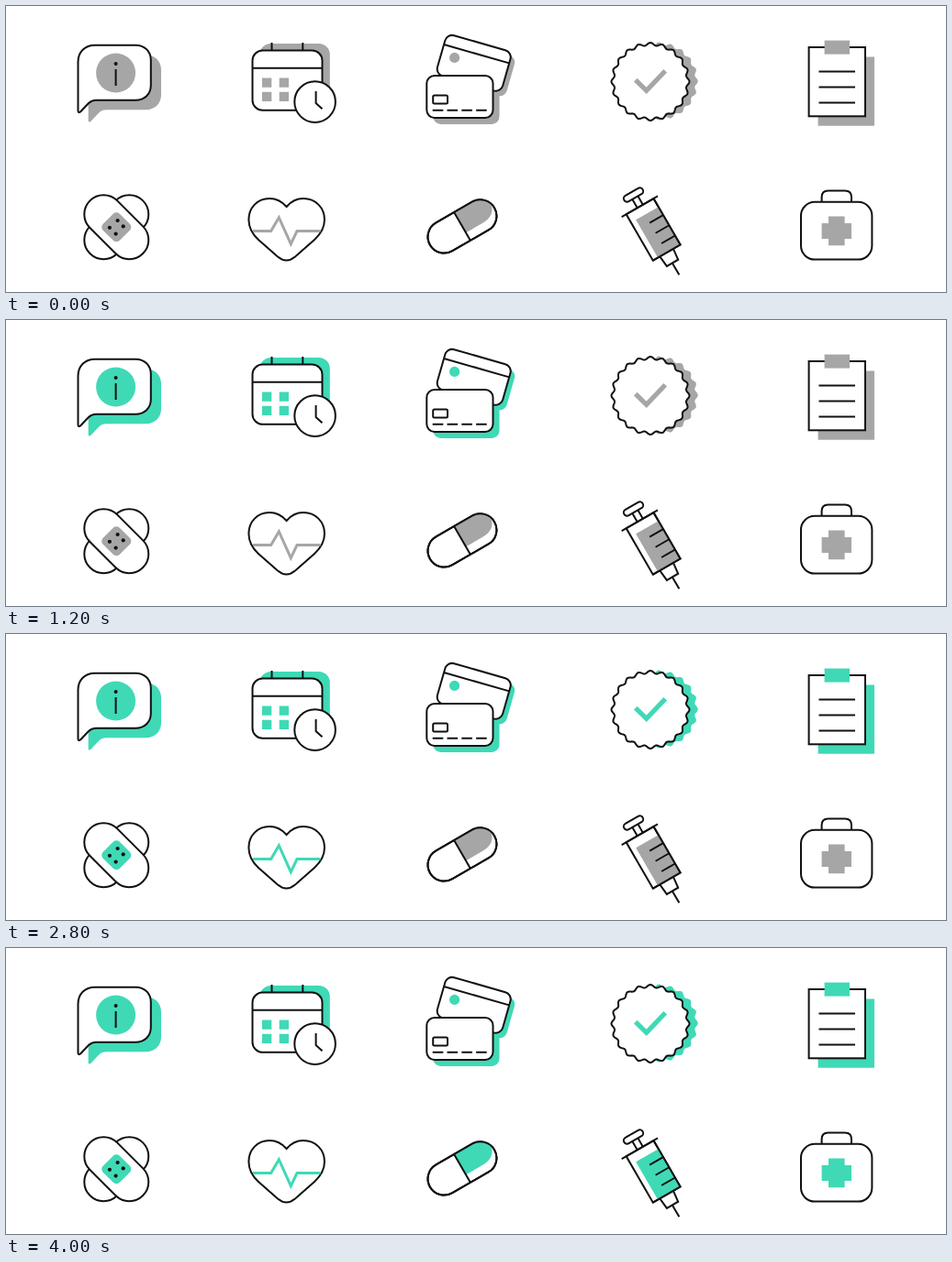
Recreate the animation shown at these times as an HTML page. Size 1024x312 px, loop 4400 ms.

```html
<!DOCTYPE html>
<html lang="en">
<head>
<meta charset="utf-8">
<title>Health icons</title>
<style>
  html, body { margin: 0; width: 100%; height: 100%; overflow: hidden; background: #fff; }
  svg { display: block; width: 100%; height: 100%; fill: #fff; stroke: #111; stroke-width: 2; }
  .icon { color: #a6a6a6; }
  .tint { fill: currentColor; stroke: none; }
  .tint-line { fill: none; stroke: currentColor; }
  .line { fill: none; }
  .dot { fill: #111; stroke: none; }
</style>
</head>
<body>
<svg viewBox="0 0 1024 312">
  <defs>
    <path id="bubble" d="M78.5 61C78.5 50 86 42.7 97 42.7H141C151 42.7 157.8 49.5 157.8 59V86.5C157.8 96 151 102.7 141 102.7H98C94.5 102.7 92.5 103.5 90 106L81.5 115C80 116.6 78.5 116.4 78.5 114.5Z"/>
    <path id="seal"/>
    <rect id="backCard" width="74" height="46" rx="8"/>
    <rect id="frontCard" x="458.3" y="76" width="72.2" height="46" rx="8.5"/>
    <rect id="plaster" x="-40.8" y="-21" width="81.6" height="42" rx="21"/>
  </defs>

  <!-- Information -->
  <g class="icon">
    <use href="#bubble" class="tint" x="11.2" y="10.5"/>
    <use href="#bubble"/>
    <circle class="tint" cx="119.6" cy="73" r="21.5"/>
    <circle class="dot" cx="119.6" cy="63" r="2"/>
    <path class="line" d="M119.6 69V87"/>
  </g>

  <!-- Calendar -->
  <g class="icon">
    <rect class="tint" x="276.5" y="41" width="76.3" height="66" rx="12"/>
    <rect x="268.5" y="48.5" width="76" height="65.3" rx="11"/>
    <path class="line" d="M268.5 67.7H344.5M289.5 40V48.5M323.3 40V48.5"/>
    <path class="tint" d="M279 78.5h10.3v10.3h-10.3zM297.7 78.5h10.3v10.3h-10.3zM279 93.7h10.3v10.3h-10.3zM297.7 93.7h10.3v10.3h-10.3z"/>
    <circle cx="336.6" cy="104.6" r="22.3"/>
    <path class="line" d="M337.6 93V106L344.5 112.3"/>
  </g>

  <!-- Payment cards -->
  <g class="icon">
    <use href="#backCard" class="tint" transform="translate(485 35.5) rotate(16)"/>
    <use href="#frontCard" class="tint" x="7" y="7"/>
    <g transform="translate(480.5 30) rotate(16)">
      <use href="#backCard"/>
      <path class="line" d="M0 12.5H74"/>
    </g>
    <circle class="tint" cx="488.6" cy="56.4" r="5.6"/>
    <use href="#frontCard"/>
    <rect x="465.2" y="97.5" width="15.8" height="9" rx="1.5"/>
    <path class="line" d="M464.7 113.7H524" stroke-dasharray="11.6 4.2"/>
  </g>

  <!-- Approved -->
  <g class="icon">
    <use href="#seal" class="tint" x="711.3" y="82"/>
    <use href="#seal" x="702" y="82.5"/>
    <path class="tint-line" d="M685.8 80.6L697.7 92.3L718.2 70.8" stroke-width="5.2"/>
  </g>

  <!-- Clipboard -->
  <g class="icon">
    <rect class="tint" x="884.6" y="55.5" width="61.4" height="75.2"/>
    <rect x="874.6" y="45" width="61.4" height="75.3"/>
    <rect class="tint" x="891.6" y="37.6" width="27.4" height="15"/>
    <path class="line" d="M885.5 71.4H925M885.5 88.4H925M885.5 105.4H925"/>
  </g>

  <!-- Plasters -->
  <g class="icon">
    <g transform="translate(120.3 241.2)">
      <use href="#plaster" transform="rotate(-45)"/>
      <use href="#plaster" transform="rotate(45)"/>
      <rect class="tint" x="-12.8" y="-12.8" width="25.6" height="25.6" rx="5" transform="rotate(45)"/>
    </g>
    <g class="dot">
      <circle cx="121.6" cy="234" r="2.1"/><circle cx="127.7" cy="240.4" r="2.1"/>
      <circle cx="112.9" cy="241.8" r="2.1"/><circle cx="119.6" cy="248.6" r="2.1"/>
    </g>
  </g>

  <!-- Heart -->
  <g class="icon">
    <path d="M305.6 219C311 212.5 317 210 324 210C337 210 347 220 347 233C347 243 342 249.5 336 255L315 273.5C309 278.5 302 278.5 296 273.5L275 255C269 249.5 264.4 243 264.4 233C264.4 220 274 210 287 210C294.5 210 300 212.5 305.6 219Z"/>
    <path class="tint-line" d="M269 245.6H288.7L297.3 230.7L310.3 259.6L317 245.6H342.5" stroke-width="3"/>
  </g>

  <!-- Pill -->
  <g class="icon" transform="translate(497 240.4) rotate(-30)">
    <rect x="-40.5" y="-17.8" width="81" height="35.6" rx="17.8"/>
    <path class="tint" d="M0 -17.8H22.7A17.8 17.8 0 0 1 39.5 -6C38 3 32 8 22 8H0Z"/>
    <rect class="line" x="-40.5" y="-17.8" width="81" height="35.6" rx="17.8"/>
    <path class="line" d="M0 -17.8V17.8"/>
  </g>

  <!-- Syringe -->
  <g class="icon" transform="translate(683.5 206) rotate(-30)">
    <path class="line" d="M-3.5 3V14.5M3.5 3V14.5"/>
    <rect x="-11.7" y="-3.7" width="23.4" height="7.4" rx="3.7"/>
    <rect x="-17.4" y="14.5" width="34.4" height="58.2"/>
    <rect class="tint" x="-11.3" y="25" width="28.3" height="47.7"/>
    <path class="line" d="M-23.2 14.5H22.2M17 14.5V72.7H-17.4M0 35.3H17M0 48.2H17M0 61.2H17M-8.7 72.7L-7.4 85.6H6.8L8.2 72.7M-.5 85.6V100.6"/>
  </g>

  <!-- First aid kit -->
  <g class="icon">
    <path d="M888.6 214V208.5Q888.6 201.5 895.6 201.5H914Q921 201.5 921 208.5V214"/>
    <rect x="866" y="213.8" width="77.4" height="62.8" rx="15"/>
    <path class="tint" d="M896 229.6h17.6v7.4h7.4v17h-7.4v7.2h-17.6v-7.2h-7.4v-17h7.4z"/>
  </g>
</svg>
<script>
  const STEP = 400, LOOP = 4400;
  const GREY = '#a6a6a6', GREEN = '#3fd9b6';
  const icons = document.querySelectorAll('.icon');

  function wavyCircle(radius, depth, waves) {
    const count = waves * 12;
    const points = Array.from({ length: count }, (_, i) => {
      const angle = i / count * 2 * Math.PI;
      const r = radius + depth * Math.cos(waves * angle);
      return `${(r * Math.cos(angle)).toFixed(2)} ${(r * Math.sin(angle)).toFixed(2)}`;
    });
    return `M${points.join('L')}Z`;
  }

  document.getElementById('seal').setAttribute('d', wavyCircle(41, 1.5, 20));

  // Each step lights one more icon; the loop starts again all grey.
  function draw(time) {
    const lit = Math.floor(time % LOOP / STEP);
    icons.forEach((icon, i) => { icon.style.color = i < lit ? GREEN : GREY; });
  }

  const start = performance.now();
  function tick() {
    draw(performance.now() - start);
    requestAnimationFrame(tick);
  }
  tick();
</script>
</body>
</html>
```
